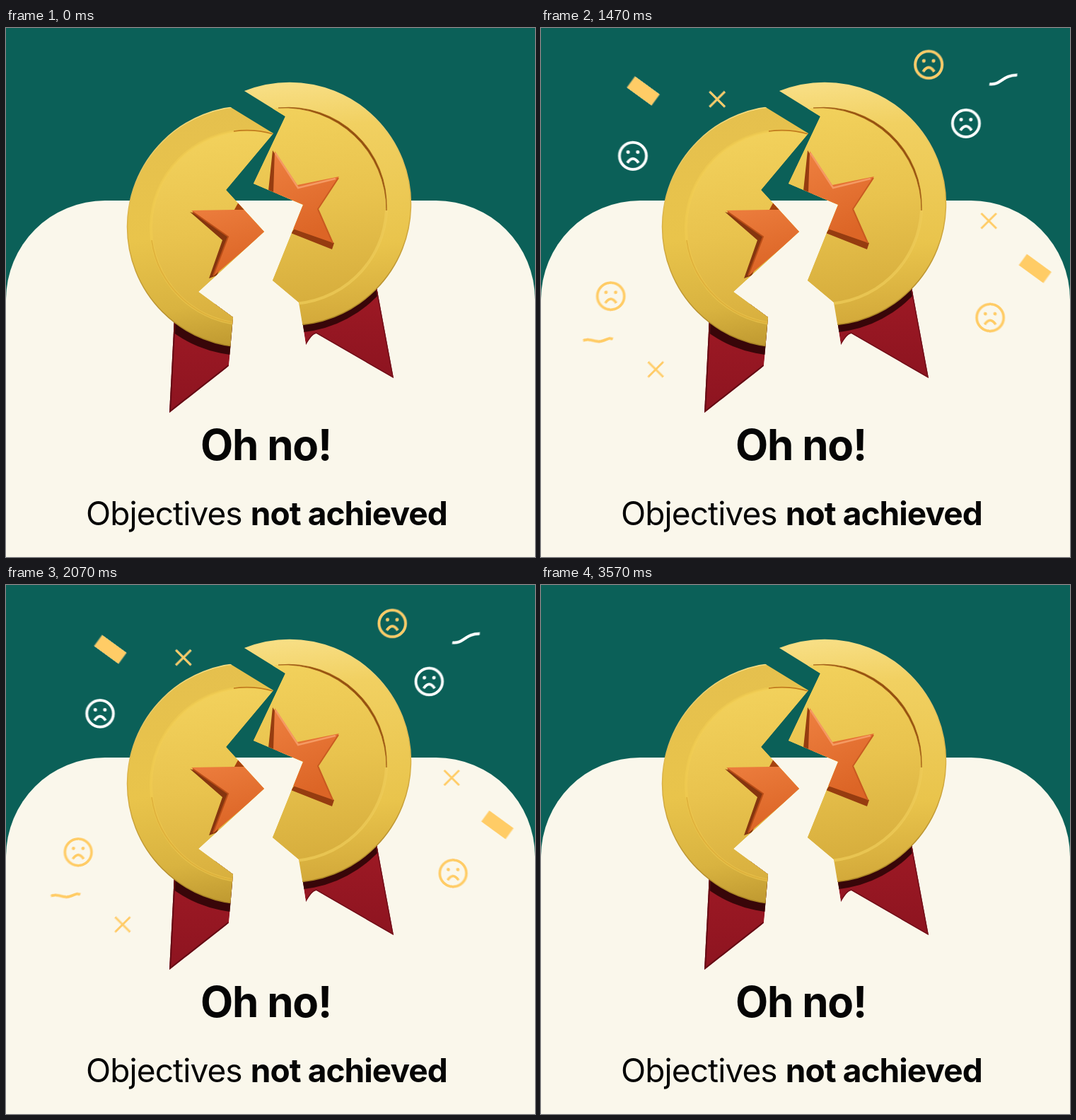
Write an HTML page with a canvas that moves like this. It is 748 px wide and 748 px high and loops after 3.6 s.

```html
<!DOCTYPE html>
<html lang="en">
<head>
<meta charset="utf-8">
<title>Oh no!</title>
<style>
  html, body { margin: 0; width: 100%; height: 100%; overflow: hidden; background: #0b6058; }
  svg, canvas { position: absolute; left: 0; top: 0; width: 748px; height: 748px; display: block; }
  text { font-family: Inter, sans-serif; font-optical-sizing: none; letter-spacing: -0.02em; text-anchor: middle; fill: #050505; }
  .title { font-size: 60px; font-weight: 700; }
  .line { font-size: 46px; font-weight: 400; }
  .strong { font-weight: 700; }
</style>
</head>
<body>
<svg viewBox="0 0 748 748">
  <rect width="748" height="748" fill="#0b6058"/>
  <path d="M0 384A140 140 0 0 1 140 244H608A140 140 0 0 1 748 384V748H0Z" fill="#faf7eb"/>
</svg>

<canvas id="confetti" width="748" height="748"></canvas>

<svg viewBox="0 0 748 748">
  <defs>
    <linearGradient id="rimL" x1=".35" y1="0" x2=".5" y2="1">
      <stop offset="0" stop-color="#e5c04e"/>
      <stop offset=".5" stop-color="#e9c44b"/>
      <stop offset=".8" stop-color="#d9b340"/>
      <stop offset="1" stop-color="#bd972f"/>
    </linearGradient>
    <linearGradient id="rimR" x1=".45" y1="0" x2=".55" y2="1">
      <stop offset="0" stop-color="#f8df86"/>
      <stop offset=".2" stop-color="#f1d061"/>
      <stop offset=".7" stop-color="#e9c44c"/>
      <stop offset="1" stop-color="#d3a93a"/>
    </linearGradient>
    <linearGradient id="face" x1=".4" y1="0" x2=".55" y2="1">
      <stop offset="0" stop-color="#f2d15c"/>
      <stop offset=".5" stop-color="#e9c34e"/>
      <stop offset="1" stop-color="#d7ae3d"/>
    </linearGradient>
    <linearGradient id="edge" x1="0" y1="0" x2="0" y2="1">
      <stop offset="0" stop-color="#f6dd83"/>
      <stop offset=".5" stop-color="#d9b044"/>
      <stop offset="1" stop-color="#a98324"/>
    </linearGradient>
    <linearGradient id="star" x1="0" y1="0" x2=".3" y2="1">
      <stop offset="0" stop-color="#ee8040"/>
      <stop offset="1" stop-color="#dc6526"/>
    </linearGradient>
    <linearGradient id="red" x1="0" y1="0" x2="0" y2="1">
      <stop offset="0" stop-color="#a01a25"/>
      <stop offset="1" stop-color="#8d1420"/>
    </linearGradient>
    <clipPath id="leftHalf">
      <path d="M254 73L378 149 311 229 365 288 272 373 321 409 315 478 200 580 100 560V60Z"/>
    </clipPath>
    <clipPath id="rightHalf">
      <path d="M279 53L395 125 350 220 420 250 377 357 414 388 424 448 560 520 640 400V40Z"/>
    </clipPath>
    <clipPath id="ribbonL"><path id="tailL" d="M239 390L231 544 315 478 325 390Z"/></clipPath>
    <clipPath id="ribbonR"><path id="tailR" d="M414 380L424 448Q433 432 439 432L548 495 521 350Z"/></clipPath>
  </defs>

  <g clip-path="url(#leftHalf)">
    <use href="#tailL" fill="url(#red)"/>
    <g clip-path="url(#ribbonL)">
      <circle cx="337" cy="291" r="172" fill="#380609"/>
      <path d="M239 390L231 544 315 478" fill="none" stroke="#640b14" stroke-width="4"/>
    </g>
    <circle cx="342" cy="281" r="170.5" fill="url(#rimL)" stroke="url(#edge)" stroke-width="1.5"/>
    <circle cx="342" cy="282" r="137" fill="url(#face)" stroke="#f3ce52" stroke-width="4" stroke-opacity=".55"/>
    <path d="M206 300A137 137 0 0 0 330 418" fill="none" stroke="#d9a735" stroke-width="2" opacity=".6"/>
    <path d="M322 146Q350 142 378 150" fill="none" stroke="#c07a1e" stroke-width="1.6"/>
    <path d="M260 260L306 300 287 354 298 350 330 285Z" fill="#85350f"/>
    <path d="M262 258L323 257 329 246 367 288 293 351 314 295Z" fill="url(#star)"/>
    <path d="M323 257L329 246 338 257Z" fill="#a5430f"/>
    <path d="M264 260L314 295 293 350" fill="none" stroke="#b94d17" stroke-width="2"/>
  </g>

  <g clip-path="url(#rightHalf)">
    <use href="#tailR" fill="url(#red)"/>
    <g clip-path="url(#ribbonR)">
      <circle cx="402" cy="259" r="172" fill="#380609"/>
      <path d="M424 448Q433 432 439 432L548 495 521 350" fill="none" stroke="#72101a" stroke-width="3"/>
    </g>
    <circle cx="401" cy="249" r="171.5" fill="url(#rimR)" stroke="url(#edge)" stroke-width="1.5"/>
    <circle cx="400" cy="251" r="139" fill="url(#face)"/>
    <path d="M538 258A139 139 0 0 1 400 390" fill="none" stroke="#f0cd5b" stroke-width="4" opacity=".7"/>
    <path d="M385 113A139 139 0 0 1 538 258A145 145 0 0 0 385 113Z" fill="#94500f" stroke="#a5611a" stroke-width=".8"/>
    <path d="M377 173L371 230 385 236 388 190ZM403 290L461 313 464 304 412 278Z" fill="#963c10"/>
    <path d="M380 174L412 222 471 210 441 255 463 304 403 283 420 250 378 233Z" fill="url(#star)"/>
    <path d="M381 177L413 226 466 213" fill="none" stroke="#f59a63" stroke-width="2.5"/>
    <path d="M470 212L441 256 462 304" fill="none" stroke="#c95a20" stroke-width="2"/>
  </g>

  <text class="title" x="367.5" y="611">Oh no!</text>
  <text class="line" x="368.5" y="703">Objectives <tspan class="strong">not achieved</tspan></text>
</svg>

<script>
  const SIZE = 748, CX = 385, CY = 260;
  const CYCLE = 1800, IN_END = 630, OUT_START = 1230, OUT_END = 1770;
  const SHUTTER = 44, SAMPLES = 51;
  const YELLOW = '#fdcb6b', WHITE = '#fff';
  const ctx = document.getElementById('confetti').getContext('2d');

  const stroked = (d, color, width) => (x, y) => {
    ctx.translate(x, y);
    ctx.strokeStyle = color;
    ctx.lineWidth = width;
    ctx.stroke(new Path2D(d));
  };
  const cross = stroked('M-11-11L11 11M11-11L-11 11', YELLOW, 3);
  const whiteWave = stroked('M-20 7C-3 9-2-6 20-6', WHITE, 4);
  const yellowWave = stroked('M-22 1C-10-3-5 5 5 2S14-3 21-1', YELLOW, 4);
  const sadFace = color => (x, y) => {
    stroked('M19.5 0A19.5 19.5 0 1 1-19.5 0A19.5 19.5 0 1 1 19.5 0M-8 10Q0-2 8 10', color, 3.8)(x, y);
    ctx.fillStyle = color;
    ctx.fill(new Path2D('M-9.5-5.5a2.5 2.5 0 1 0 5 0a2.5 2.5 0 1 0-5 0M4.5-5.5a2.5 2.5 0 1 0 5 0a2.5 2.5 0 1 0-5 0'));
  };
  const strip = (x, y) => {
    ctx.translate(x, y);
    ctx.rotate(0.63);
    ctx.fillStyle = YELLOW;
    ctx.fillRect(-22, -10, 44, 20);
  };
  const yellowFace = sadFace(YELLOW), whiteFace = sadFace(WHITE);

  const pieces = [
    [yellowFace, 552, 47], [whiteFace, 606, 132], [whiteFace, 124, 179],
    [yellowFace, 92, 382], [yellowFace, 641, 413],
    [cross, 246, 97], [cross, 639, 273], [cross, 157, 488],
    [strip, 139, 85], [strip, 706, 342],
    [whiteWave, 660, 68], [yellowWave, 74, 445]
  ];

  // A fast burst with a long soft tail: 0 to 1 over the given span.
  function burst(t, span) {
    if (t <= 0) return 0;
    if (t >= span) return 1;
    return 1 - 0.91 * Math.exp(-t / 25) - 0.09 * (1 - t / span) ** 1.7;
  }

  function spread(t) {
    return t < OUT_START ? burst(t, IN_END) : burst(OUT_END - t, OUT_END - OUT_START);
  }

  function drawPieces(s) {
    if (s <= 0) return;
    for (const [draw, x, y] of pieces) {
      ctx.setTransform(s, 0, 0, s, CX * (1 - s), CY * (1 - s));
      draw(x, y);
    }
  }

  function render(t) {
    ctx.setTransform(1, 0, 0, 1, 0, 0);
    ctx.clearRect(0, 0, SIZE, SIZE);
    if (t < 20 || t >= OUT_END - 5) return;

    const from = t - SHUTTER / 2;
    const moved = Math.abs(spread(from + SHUTTER) - spread(from)) * 330;
    const n = moved < 2 ? 1 : SAMPLES;
    ctx.globalCompositeOperation = n > 1 ? 'lighter' : 'source-over';
    ctx.globalAlpha = 1 / n;
    for (let i = 0; i < n; i++) {
      drawPieces(spread(n > 1 ? from + SHUTTER * i / (n - 1) : t));
    }
  }

  const start = performance.now();
  function frame() {
    render((performance.now() - start) % CYCLE);
    requestAnimationFrame(frame);
  }
  frame();
</script>
</body>
</html>
```
